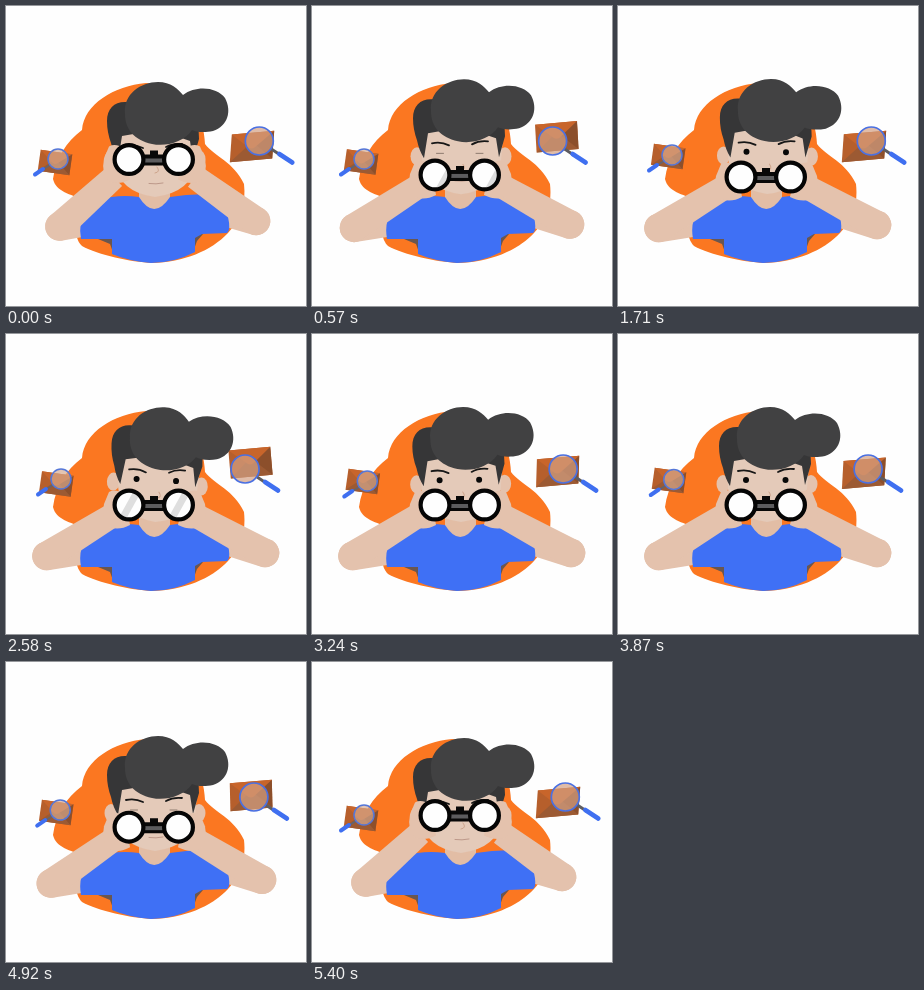
An HTML page for the animation above (5460 ms loop, 300 by 300 pixels).

```html
<!DOCTYPE html>
<html lang="en">
<head>
<meta charset="utf-8">
<title>Lookout</title>
<style>
  html, body { margin: 0; width: 100%; height: 100%; overflow: hidden; background: #fefefe; }
  svg { display: block; width: 100vw; height: 100vh; }
  .skin { fill: #e4c2ad; }
  .face { fill: #e4cab9; }
  .line { fill: none; stroke-linecap: round; stroke-linejoin: round; }
</style>
</head>
<body>
<svg viewBox="0 0 300 300">
  <defs>
    <clipPath id="lens"><circle r="14"/></clipPath>
    <g id="envelope">
      <path d="M-21-14H21V14H-21Z" fill="#b65f2c"/>
      <path d="M21-14V14L0 0Z" fill="#8c4f2b"/>
      <path d="M-21 14L-3-2H3L21 14Z" fill="#9c5a33"/>
      <path d="M-21-14H21L3 1Q0 3-3 1Z" fill="#c8652b"/>
    </g>
    <g id="barrel">
      <circle r="15.2" fill="#fefefe"/>
      <g clip-path="url(#lens)">
        <path class="glint" d="M-11 14L5-15H13L-3 14Z" fill="#dedede"/>
      </g>
      <circle r="14.4" fill="none" stroke="#050505" stroke-width="4.2"/>
    </g>
  </defs>

  <path fill="#fb7721" d="M140 77C108 80 78 98 76 124C60 136 50 152 47 173C50 186 65 188 77 194
    C70 212 66 230 76 240C92 249 125 256 146 257C178 256 205 245 222 227C236 212 240 196 238 178
    C228 156 208 150 199 138C198 110 184 80 140 77Z"/>

  <g id="leftMail"><use href="#envelope" transform="rotate(8) scale(.76)"/></g>
  <g id="leftGlass">
    <path class="line" d="M-8 6L-16 11" stroke="#66636b" stroke-width="2"/>
    <path class="line" d="M-15 10L-23 15.500" stroke="#3f6ff0" stroke-width="4"/>
    <circle r="10" fill="#d6aa8f" fill-opacity=".68" stroke="#5577d8" stroke-width="1.500"/>
  </g>
  <g id="rightMail"><use href="#envelope" transform="rotate(-5)"/></g>
  <g id="rightGlass">
    <path class="line" d="M12 8L21 14" stroke="#5e5c60" stroke-width="3"/>
    <path class="line" d="M20 13L33 21.500" stroke="#3f6ff0" stroke-width="4.600"/>
    <circle r="14" fill="#d3a083" fill-opacity=".7" stroke="#4a70e2" stroke-width="1.700"/>
  </g>

  <path class="skin" id="upperL"/>
  <path class="skin" id="upperR"/>
  <path fill="#6a5650" d="M92 233H108V249L104 238ZM197 228H187V246L191 235Z"/>
  <path fill="#3f70f5" d="M75 233Q72 216 80 206L92 194Q112 188 133 191H164Q188 187 212 189
    L222 211Q225 224 221 227L196 228L189 232V246Q168 257 145 257Q122 255 106 248V233Z"/>
  <path fill="#e2bda5" d="M133 170V191Q148 215 164 191V170Z"/>

  <g id="head">
    <ellipse class="skin" cx="105" cy="150" rx="6.500" ry="9"/>
    <ellipse class="skin" cx="193" cy="150" rx="6.500" ry="9"/>
    <path class="face" d="M108 118L110 155Q113 183 149 188Q186 183 189 155L192 118Z"/>
    <path fill="#363637" d="M101 112C101 99 109 92 121 93L150 85L192 108L193 130L187 151
      L184 132Q150 119 116 127L112 152Q107 144 105 134Q101 123 101 112Z"/>
    <path fill="#414142" d="M119 105C117 85 135 73 152 73C165 73 172 80 177 86C190 76 211 78 219 89
      C226 102 222 117 207 122C198 124 190 123 186 121C178 133 160 138 146 135C128 131 119 120 119 105Z"/>
    <path class="line" d="M120 137Q129 135 137 139M160 138Q167 134 176 135" stroke="#171717" stroke-width="1.800"/>
    <g id="eyes" fill="#080808"><circle cx="128" cy="146" r="3"/><circle cx="167.500" cy="146" r="3"/></g>
    <path id="lids" class="line" d="M124.500 147H131.500M164 147H171" stroke="#8d7a6e"/>
    <path class="line" d="M151 158Q155 163 149 164" stroke="#cda48c"/>
    <path class="line" d="M143 174.500Q150 175.500 157 174" stroke="#bd998a"/>
  </g>

  <path class="skin" id="foreL"/>
  <path class="skin" id="foreR"/>
  <g id="binoculars">
    <path class="skin" d="M103-13Q110-17 119-10L124 20Q113 26 103 22Q95 14 98-1Z"/>
    <path class="skin" d="M194-13Q187-17 178-10L172 20Q184 26 194 22Q202 14 199-1Z"/>
    <path fill="#080808" d="M138-5H144V-9H152V-5H158V6H138Z"/>
    <path fill="#5c5c5e" d="M139-1H157V3H139Z"/>
    <use href="#barrel" x="123"/>
    <use href="#barrel" x="172.500"/>
  </g>
</svg>
<script>
const LOOP = 5460, END = 5400, SWING = 900;
const $ = id => document.getElementById(id);
const set = (id, name, value) => $(id).setAttribute(name, value);
const mix = (a, b, k) => a + (b - a) * k;
const mixPoint = (a, b, k) => [mix(a[0], b[0], k), mix(a[1], b[1], k)];
const clamp = k => Math.min(1, Math.max(0, k));
const smooth = k => k * k * (3 - 2 * k);
const cubic = k => k < .5 ? 4 * k ** 3 : 1 - 4 * (1 - k) ** 3;

// Each step is [time, value].
function track(steps, t, ease = smooth) {
  const i = steps.findIndex(s => s[0] > t);
  if (i < 0) return steps[steps.length - 1][1];
  if (i === 0) return steps[0][1];
  const [a, b] = [steps[i - 1], steps[i]];
  return mix(a[1], b[1], ease((t - a[0]) / (b[0] - a[0])));
}

const lowered = [[80, 0], [790, 1], [4650, 1], [5270, 0]];
const turn = [[1480, 0], [2300, 3.2], [2650, 3.2], [3160, -.5], [3700, 0]];
const lids = [[640, 0], [800, 1], [4750, 1], [4880, 0]];
const mailRise = [[0, 0], [500, -.5], [1710, -6], [2580, -6.5], [3240, -9], [4500, -11], [END, 0]];
const glassX = [[570, 52], [1710, 54], [2580, 55], [4500, 56], [END, 52]];
const glassY = [[570, 153], [1710, 149], [2580, 145], [3240, 147], [4500, 144], [END, 153]];
const glints = [[300, 700], [2330, 2830]];

const arms = {
  L: { elbow: [[53.5, 220.5], [40.5, 222]], hand: [[108, 171], [107, 181]], sleeve: [86, 216] },
  R: { elbow: [[250, 215], [259, 219]], hand: [[189, 171], [189, 181]], sleeve: [211, 205] }
};

// Tapered limb with a round end at a.
function limb(a, ra, b, rb) {
  const dx = b[0] - a[0], dy = b[1] - a[1], len = Math.hypot(dx, dy);
  const nx = -dy / len, ny = dx / len;
  const at = (p, r) => `${p[0] + nx * r} ${p[1] + ny * r}`;
  return `M${at(b, -rb)}L${at(a, -ra)}A${ra} ${ra} 0 0 0 ${at(a, ra)}L${at(b, rb)}Z`;
}

function swing(t, power) {
  const half = Math.floor(t / SWING), k = cubic((t / SWING % 1) ** power);
  return half % 2 ? 1 - k : k;
}

function draw(now) {
  const t = Math.min(now % LOOP, END);
  const p = track(lowered, t, cubic);
  const open = track(lids, t);

  set('head', 'transform', `translate(0 ${3 * (1 - p)}) rotate(${track(turn, t)} 149 192)`);
  set('eyes', 'opacity', open > .5 ? 1 : 0);
  set('lids', 'opacity', open > .5 ? 0 : 1);
  set('binoculars', 'transform', `translate(0 ${mix(153.5, 171, p)})`);

  for (const side in arms) {
    const arm = arms[side];
    const elbow = mixPoint(...arm.elbow, p), hand = mixPoint(...arm.hand, p);
    set('fore' + side, 'd', limb(elbow, 14.3, hand, 12));
    set('upper' + side, 'd', limb(elbow, 14.3, arm.sleeve, 13));
  }

  const flash = glints.find(g => t > g[0] && t < g[1]);
  const shift = flash ? mix(-32, 32, clamp((t - flash[0]) / (flash[1] - flash[0]))) : 60;
  document.querySelector('.glint').setAttribute('transform', `translate(${shift} 0)`);

  const drift = track(mailRise, t);
  set('leftMail', 'transform', `translate(${49 - drift * .2} ${156.5 + drift})`);
  set('leftGlass', 'transform', `translate(${track(glassX, t)} ${track(glassY, t)})`);
  const k = swing(t, 1);
  set('rightMail', 'transform', `translate(${mix(246, 244.5, k)} ${mix(140.5, 128.5, k)}) skewX(${mix(-9, 0, k)})`);
  set('rightGlass', 'transform', `translate(${mix(253.3, 239, swing(t, .8))} 135)`);
}

const start = performance.now();
function tick() {
  draw(performance.now() - start);
  requestAnimationFrame(tick);
}
tick();
</script>
</body>
</html>
```
